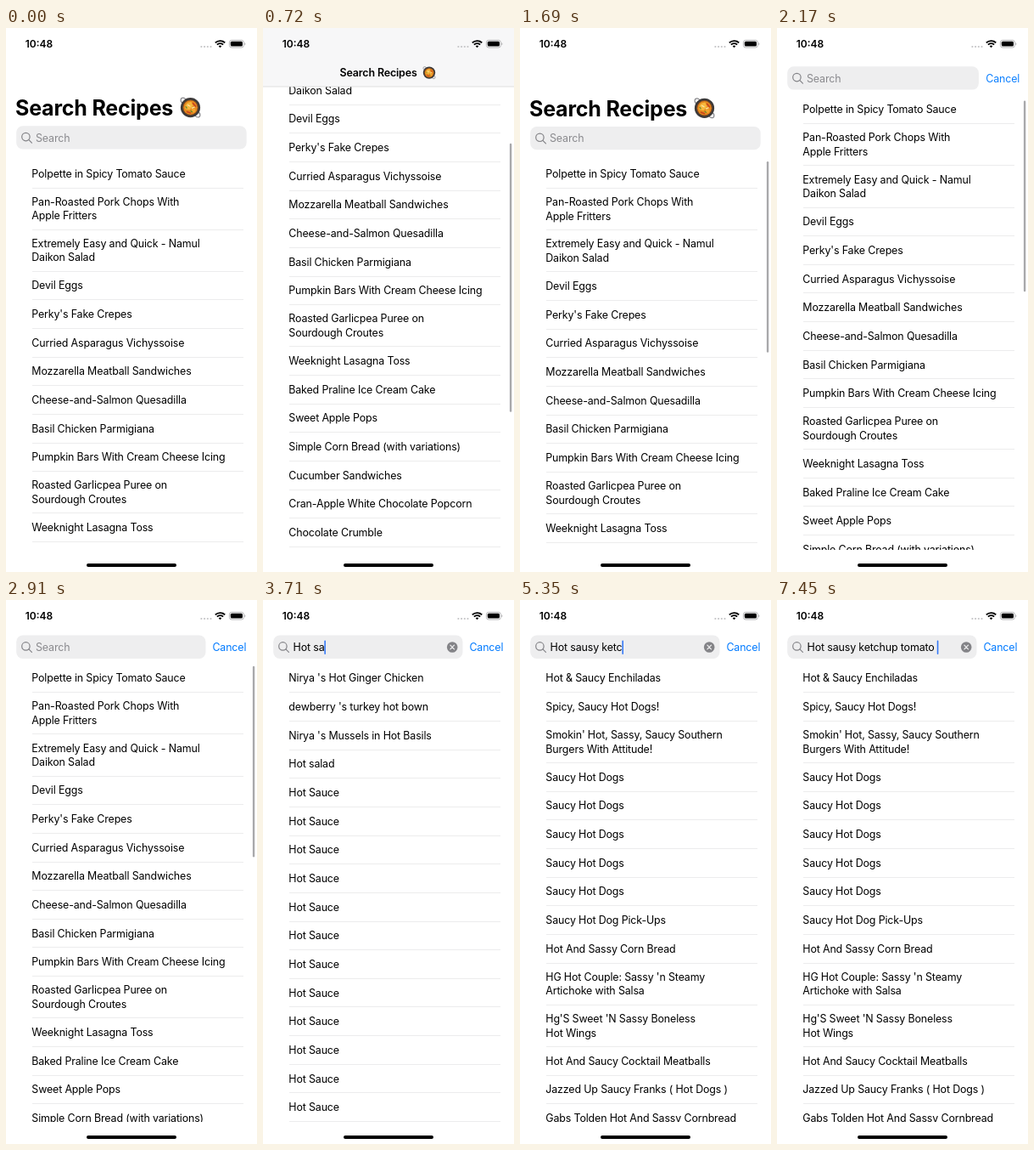
Write an HTML page that moves like this. It is 296 px wide and 640 px high and loops after 8000 ms.

```html
<!DOCTYPE html>
<html lang="en">
<head>
<meta charset="utf-8">
<title>Search Recipes</title>
<style>
  html, body { margin: 0; width: 100%; height: 100%; overflow: hidden; background: #fff; }
  svg { display: block; width: 100vw; height: 100vh; }
  text {
    font: 400 12.45px Inter, Roboto, sans-serif;
    font-optical-sizing: none;
    letter-spacing: -0.15px;
    white-space: pre;
  }
  .large { font-size: 25px; font-weight: 700; letter-spacing: -0.2px; }
  .small { font-weight: 600; }
  .clock { font-size: 12px; font-weight: 600; letter-spacing: 0; }
</style>
</head>
<body>
<svg viewBox="0 0 296 640">
  <defs>
    <g id="pan">
      <g fill="none" stroke="#8a8a8e" stroke-width="1.2">
        <circle cx="-8.6" cy="-8.6" r="2.8"/>
        <circle cx="8.6" cy="8.6" r="2.8"/>
      </g>
      <circle r="11.6" fill="#3c3a3a"/>
      <circle r="9.2" fill="#8a4a1c"/>
      <circle r="8.3" fill="#e58a1f"/>
      <path d="M-6 2A6.5 6.5 0 0 1 1 -6.5L3 -2L-1 3Z" fill="#f6b73c"/>
      <circle cx="3.6" cy="3.4" r="2.4" fill="#f3a52d"/>
      <path d="M-4 5L0 6.4M3 -5L6 -1.5" stroke="#c8401f" stroke-width="1.6" stroke-linecap="round"/>
      <path d="M-3 -3L-.5 -1.6M2 .6L4.6 -.4" stroke="#fbe3a0" stroke-width="1.4" stroke-linecap="round"/>
      <path d="M-5.4 -1L-4.4 .6M.6 4L2 5" stroke="#6d8a2c" stroke-width="1.3" stroke-linecap="round"/>
    </g>
  </defs>

  <rect width="296" height="640" fill="#fff"/>
  <g id="list"></g>
  <rect id="header" width="296" fill="#fff"/>
  <rect y="614" width="296" height="26" fill="#fff"/>

  <g id="title">
    <text class="large" x="11" y="103">Search Recipes</text>
    <use href="#pan" x="217.5" y="93.6"/>
  </g>

  <g id="field">
    <rect id="box" x="12.2" rx="7.6" fill="#eeeeef"/>
    <g id="inside">
      <g fill="none" stroke="#838387" stroke-width="1.2" stroke-linecap="round">
        <circle cx="23.4" cy="12.8" r="4.7"/>
        <path d="M26.9 16.3L30.4 19.8"/>
      </g>
      <text id="hint" x="35" y="18.4" fill="#8a8a8e">Search</text>
      <g id="typing">
        <text id="query" x="35.6" y="18.4"></text>
        <rect id="caret" y="6" width="1.6" height="16.4" rx=".8" fill="#3478f6"/>
        <circle cx="223.2" cy="13.9" r="6.3" fill="#838387"/>
        <path d="M220.9 11.6l4.6 4.6m0 -4.6l-4.6 4.6" stroke="#f2f2f3" stroke-width="1.2" stroke-linecap="round"/>
      </g>
    </g>
  </g>
  <text id="cancel" fill="#007aff">Cancel</text>

  <g id="bar">
    <rect id="barFill" width="296" height="69"/>
    <g id="barTitle">
      <rect y="68.6" width="296" height=".8" fill="#d6d6d8"/>
      <text class="small" x="90.6" y="56.8">Search Recipes</text>
      <use href="#pan" transform="translate(196 52.6) scale(.62)"/>
    </g>
  </g>

  <rect id="thumb" x="290.9" width="2.4" rx="1.2" fill="#a9a9ab"/>

  <g id="status">
    <text class="clock" x="22.8" y="23">10:48</text>
    <g fill="#c4c4c6">
      <circle cx="230.4" cy="22" r="1.1"/><circle cx="234.1" cy="22" r="1.1"/>
      <circle cx="237.8" cy="22" r="1.1"/><circle cx="241.5" cy="22" r="1.1"/>
    </g>
    <g fill="none" stroke="#000" stroke-width="1.9">
      <path d="M246.8 17.4A8.2 8.2 0 0 1 258.2 17.4"/>
      <path d="M248.9 19.7A5.1 5.1 0 0 1 256.1 19.7"/>
    </g>
    <path d="M250.7 21.3A2.6 2.6 0 0 1 254.3 21.3L252.5 23.2Z"/>
    <rect x="263.4" y="14.4" width="17" height="8.6" rx="2.7" fill="none" stroke="#a4a4a6" stroke-width=".8"/>
    <rect x="264.8" y="15.8" width="14.2" height="5.8" rx="1.5"/>
    <path d="M281.5 17.2a1.7 1.7 0 0 1 0 3Z" fill="#a4a4a6"/>
  </g>
  <rect x="95" y="630" width="106" height="4" rx="2"/>
</svg>

<script>
const LOOP = 8000, ROW = 33.65, TALL = 49.1, BOTTOM = 614, CONTENT = 940;
const $ = id => document.getElementById(id);
const set = (id, attrs) => { for (const k in attrs) $(id).setAttribute(k, attrs[k]); };
const show = (id, on) => set(id, { visibility: on ? 'visible' : 'hidden' });
const clamp = (v, lo = 0, hi = 1) => Math.min(hi, Math.max(lo, v));
const mix = (a, b, p) => a + (b - a) * p;
const repeat = (name, n) => Array(n).fill(name);

// Value of the latest [time, value] step that has begun.
const at = (steps, t, start) => {
  let value = start;
  for (const [time, v] of steps) if (t >= time) value = v;
  return value;
};

const hotDogs = repeat('Saucy Hot Dogs', 5);
const saucy = [
  'Saucy Hot Dog Pick-Ups', 'Hot And Sassy Corn Bread',
  "HG Hot Couple: Sassy 'n Steamy\nArtichoke with Salsa",
  "Hg'S Sweet 'N Sassy Boneless\nHot Wings",
  'Hot And Saucy Cocktail Meatballs', 'Jazzed Up Saucy Franks ( Hot Dogs )',
  'Gabs Tolden Hot And Sassy Cornbread'
];
const attitude = "Smokin' Hot, Sassy, Saucy Southern\nBurgers With Attitude!";
const gingerRows = [
  "Nirya 's Hot Ginger Chicken", "dewberry 's turkey hot bown", "Nirya 's Mussels in Hot Basils"
];

const lists = {
  all: [
    'Polpette in Spicy Tomato Sauce', 'Pan-Roasted Pork Chops With\nApple Fritters',
    'Extremely Easy and Quick - Namul\nDaikon Salad', 'Devil Eggs', "Perky's Fake Crepes",
    'Curried Asparagus Vichyssoise', 'Mozzarella Meatball Sandwiches',
    'Cheese-and-Salmon Quesadilla', 'Basil Chicken Parmigiana',
    'Pumpkin Bars With Cream Cheese Icing', 'Roasted Garlicpea Puree on\nSourdough Croutes',
    'Weeknight Lasagna Toss', 'Baked Praline Ice Cream Cake', 'Sweet Apple Pops',
    'Simple Corn Bread (with variations)', 'Cucumber Sandwiches',
    'Cran-Apple White Chocolate Popcorn', 'Chocolate Crumble',
    'Creamy Potato Soup', 'Lemon Garlic Chicken', 'Spinach Salad'
  ],
  hot: ['Hot salad', ...gingerRows, ...repeat('Hot Sauce', 12)],
  salad: [...gingerRows, 'Hot salad', ...repeat('Hot Sauce', 12)],
  sauce: repeat('Hot Sauce', 16),
  dogs: [...hotDogs, 'Hot & Saucy Enchiladas', 'Spicy, Saucy Hot Dogs!', attitude, ...saucy],
  saucy: ['Hot & Saucy Enchiladas', 'Spicy, Saucy Hot Dogs!', attitude, ...hotDogs, ...saucy]
};

const listSteps = [[3120, 'hot'], [3710, 'salad'], [3930, 'sauce'], [4530, 'dogs'], [4960, 'saucy']];
const scrollSteps = [
  [500, 22], [610, 104], [720, 196], [820, 258], [930, 270], [1040, 180], [1140, 60], [1250, -14],
  [1370, -8], [1480, -4], [1580, -1.8], [1690, -0.7]
];
const focusSteps = [[1850, .15], [1960, .5], [2070, .8], [2170, .95], [2280, 1]];

const phrase = 'Hot sausy ketchup tomato ';
const keyTimes = [
  3010, 3120, 3260, 3390, 3540, 3710, 3930, 4050, 4400, 4530, 4850, 4960, 5150,
  5350, 5490, 5620, 5820, 6150, 6770, 6880, 7000, 7110, 7220, 7340, 7450
];

const make = (tag, attrs, content = '') => {
  const el = document.createElementNS('http://www.w3.org/2000/svg', tag);
  for (const k in attrs) el.setAttribute(k, attrs[k]);
  el.textContent = content;
  return el;
};

let shown;
function fillList(name) {
  if (name === shown) return;
  shown = name;
  let y = 0;
  const parts = [];
  for (const recipe of lists[name]) {
    const lines = recipe.split('\n');
    const h = lines.length > 1 ? TALL : ROW;
    lines.forEach((line, i) => {
      const mid = y + h / 2 + (i - (lines.length - 1) / 2) * 16.7;
      parts.push(make('text', { x: 30.3, y: mid + 4.4 }, line));
    });
    y += h;
    parts.push(make('rect', {
      x: 30.5, y: y - .5, width: 249.5, height: 1, fill: '#ececed', 'shape-rendering': 'crispEdges'
    }));
  }
  $('list').replaceChildren(...parts);
}

function drawHeader(scroll, focus) {
  const pull = Math.max(0, -scroll);
  const slide = Math.max(0, scroll - 39.5);
  const collapsed = scroll > 79;
  set('header', { height: mix(Math.max(69, 148 - scroll), 72, focus) });
  set('title', {
    transform: `translate(0 ${pull - slide - focus * 40})`,
    opacity: clamp(1 - focus * 2)
  });
  show('title', !collapsed && focus < 1);

  const height = clamp(27.3 - Math.max(0, scroll), 0, 27.3);
  set('field', { transform: `translate(0 ${mix(115.3 + pull, 41.6, focus)})` });
  set('box', { width: mix(271.5, 223.3, focus), height });
  set('inside', { opacity: clamp(1 - scroll / 14) });
  show('field', height > 0);

  set('cancel', { x: mix(300, 243.4, focus), y: mix(134, 59.9, focus), opacity: focus });
  show('bar', scroll > 39.5);
  set('barFill', { fill: collapsed ? '#f7f7f8' : '#fff' });
  set('barTitle', { opacity: collapsed ? 1 : 0 });
}

function drawQuery(t) {
  const typed = phrase.slice(0, keyTimes.filter(k => t >= k).length);
  $('query').textContent = typed;
  set('hint', { opacity: typed ? 0 : 1 });
  set('typing', { opacity: typed ? 1 : 0 });
  if (typed) set('caret', { x: 35.6 + $('query').getComputedTextLength() - .2 });
}

function drawThumb(t, scroll, focus, top) {
  const view = Math.max(69, 154.4 - Math.max(0, scroll));
  const size = BOTTOM - view;
  const hidden = Math.max(0, view - (154.4 - scroll));
  set('thumb', {
    y: mix(view + 2.6 + hidden * size / CONTENT, top + 2.6, focus),
    height: size * size / CONTENT
  });
  show('thumb', t >= 500 && t < 3260);
}

function draw(t) {
  const scroll = at(scrollSteps, t, 0);
  const focus = at(focusSteps, t, 0);
  const top = mix(154.4 - scroll, 75.2, focus);
  fillList(at(listSteps, t, 'all'));
  set('list', { transform: `translate(0 ${top})` });
  drawHeader(scroll, focus);
  drawQuery(t);
  drawThumb(t, scroll, focus, top);
}

const begin = performance.now();
function tick() {
  draw((performance.now() - begin) % LOOP);
  requestAnimationFrame(tick);
}
tick();
</script>
</body>
</html>
```
